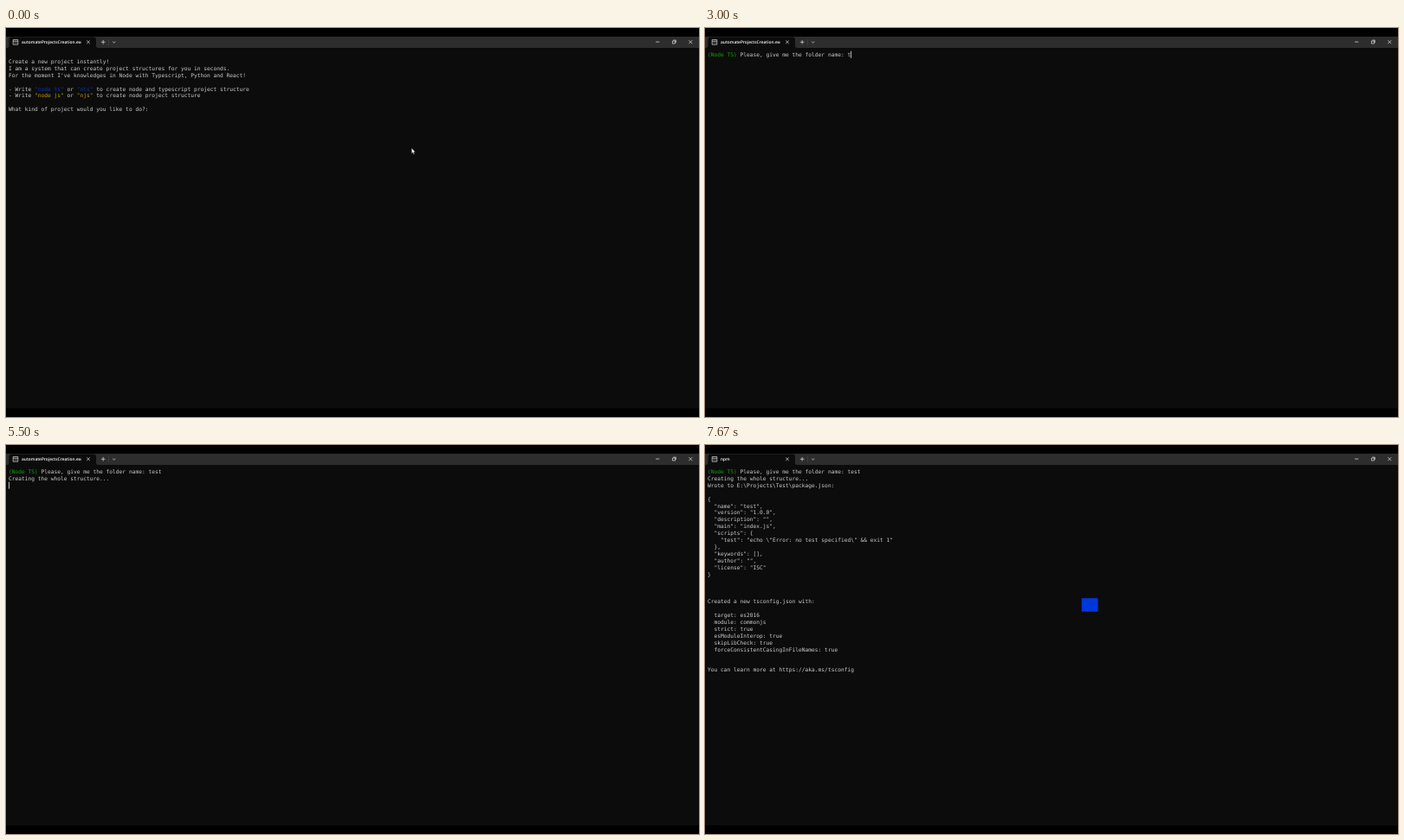
Write an HTML page that moves like this. It is 800x450 px and loops after 8 s.

```html
<!DOCTYPE html>
<html lang="en">
<head>
<meta charset="utf-8">
<title>Project creator</title>
<style>
  html, body { margin: 0; width: 100%; height: 100%; overflow: hidden; background: #000; }
  svg { display: block; width: 800px; height: 450px; }
  text { white-space: pre; text-rendering: geometricPrecision; }
  #rows { font: 6.24px "DejaVu Sans Mono", monospace; fill: #ccc; }
  #title { font: 600 4.85px "Open Sans", sans-serif; fill: #fff; }
  .icon { fill: none; stroke: #e4e4e4; stroke-width: .7; }
</style>
</head>
<body>
<svg viewBox="0 0 800 450">
  <clipPath id="tabClip"><path d="M0 10H87V23H0Z"/></clipPath>
  <path fill="#0c0c0c" d="M0 23H800V440H0Z"/>
  <path fill="#2d2d2e" d="M0 10H800V23H0Z"/>
  <path fill="#0c0c0c" d="M1 23Q3.5 23 3.5 20.5V13.5Q3.5 10.5 6.5 10.5H101Q104 10.5 104 13.5V20.5Q104 23 106.5 23Z"/>
  <g class="icon">
    <path d="M8.2 13.6H13.8V19.2H8.2ZM8.2 15.3H13.8M9.5 17.2H10.6M11.4 17.2H12.6"/>
    <path d="M93.2 14.5L96.8 18.1M96.8 14.5L93.2 18.1"/>
    <path d="M109.9 16.3H114.5M112.2 14V18.6M123.1 15.7L124.7 17.2L126.3 15.7"/>
    <path stroke="#444" d="M118.5 13V20"/>
    <path d="M750 16.1H754.3"/>
    <path d="M769.4 15H772.4V18H769.4ZM770.3 14.1H773.3V17.1"/>
    <path d="M788.3 14.2L792.3 18.2M792.3 14.2L788.3 18.2"/>
  </g>
  <g clip-path="url(#tabClip)"><text id="title" x="18" y="18.3"></text></g>
  <g id="rows"></g>
  <path id="tile" fill="#0037da" d="M434.8 177.2H453.6V192.8H434.8Z"/>
  <rect id="caret" width=".8" height="8" fill="#e8e8e8"/>
  <path id="mouse" fill="#fff" stroke="#000" stroke-width=".4"
    d="M468.2 138.8V145.2L469.7 143.9L470.7 146.2L471.7 145.7L470.7 143.6H472.6Z"/>
</svg>
<script>
const LOOP = 8000, LEFT = 3, TOP = 26.8, CELL = 3.757, LINE = 7.91;
const $ = id => document.getElementById(id);
const COLORS = { b: '#0c37b4', y: '#c19c00', g: '#13a10e' };

// Coloured runs are written as {letter|text}.
const menu = `
Create a new project instantly!
I am a system that can create project structures for you in seconds.
For the moment I've knowledges in Node with Typescript, Python and React!

- Write {b|"node ts"} or {b|"nts"} to create node and typescript project structure
- Write {y|"node js"} or {y|"njs"} to create node project structure

What kind of project would you like to do?: `;
const ask = '{g|(Node TS)} Please, give me the folder name: ';
const making = ask + 'test\nCreating the whole structure...\n';
const wrote = making + `Wrote to E:\\Projects\\Test\\package.json:

{
  "name": "test",
  "version": "1.0.0",
  "description": "",
  "main": "index.js",
  "scripts": {
    "test": "echo \\"Error: no test specified\\" && exit 1"
  },
  "keywords": [],
  "author": "",
  "license": "ISC"
}


`;
const done = wrote + `

Created a new tsconfig.json with:

  target: es2016
  module: commonjs
  strict: true
  esModuleInterop: true
  skipLibCheck: true
  forceConsistentCasingInFileNames: true


You can learn more at https://aka.ms/tsconfig`.slice(1);

const exe = 'automateProjectsCreation.exe';
// start time, screen text, caret shown, tab title
const steps = [
  [0, menu, 0, exe], [80, menu, 1, exe], [670, menu, 0, exe],
  [830, menu + 'n', 1, exe], [1000, menu + 'nt', 1, exe], [1170, menu + 'nts', 1, exe],
  [1750, ask, 1, exe], [2330, ask, 0, exe], [2920, ask, 1, exe],
  [3000, ask + 't', 1, exe], [3670, ask + 'te', 1, exe],
  [3830, ask + 'tes', 1, exe], [3920, ask + 'test', 1, exe],
  [4330, making, 1, exe], [4920, making, 0, exe], [5500, making, 1, exe], [6080, making, 0, exe],
  [6500, making, 0, 'npm'], [6580, making, 1, 'npm'], [7170, making, 0, 'npm init'],
  [7500, wrote, 1, 'npm'], [7670, done, 0, 'npm']
];

const escape = s => s.replace(/&/g, '&amp;').replace(/</g, '&lt;');
const paint = s => escape(s).replace(/\{(\w)\|(.*?)\}/g,
  (_, key, run) => `<tspan fill="${COLORS[key]}">${run}</tspan>`);
const show = (el, on) => el.setAttribute('visibility', on ? 'visible' : 'hidden');

function draw([start, screen, caretOn, title]) {
  const lines = screen.split('\n');
  $('rows').innerHTML = lines.map((line, i) =>
    `<text x="${LEFT}" y="${TOP + i * LINE + 6.2}">${paint(line)}</text>`).join('');
  const last = lines[lines.length - 1].replace(/\{\w\|(.*?)\}/g, '$1');
  $('caret').setAttribute('x', LEFT + last.length * CELL);
  $('caret').setAttribute('y', TOP + (lines.length - 1) * LINE);
  $('title').textContent = title;
  show($('caret'), caretOn);
  show($('tile'), screen === done);
  show($('mouse'), start < 830);
}

let current;
function tick() {
  const t = performance.now() % LOOP;
  const step = steps.filter(s => s[0] <= t).pop();
  if (step !== current) draw(current = step);
  requestAnimationFrame(tick);
}
tick();
</script>
</body>
</html>
```
